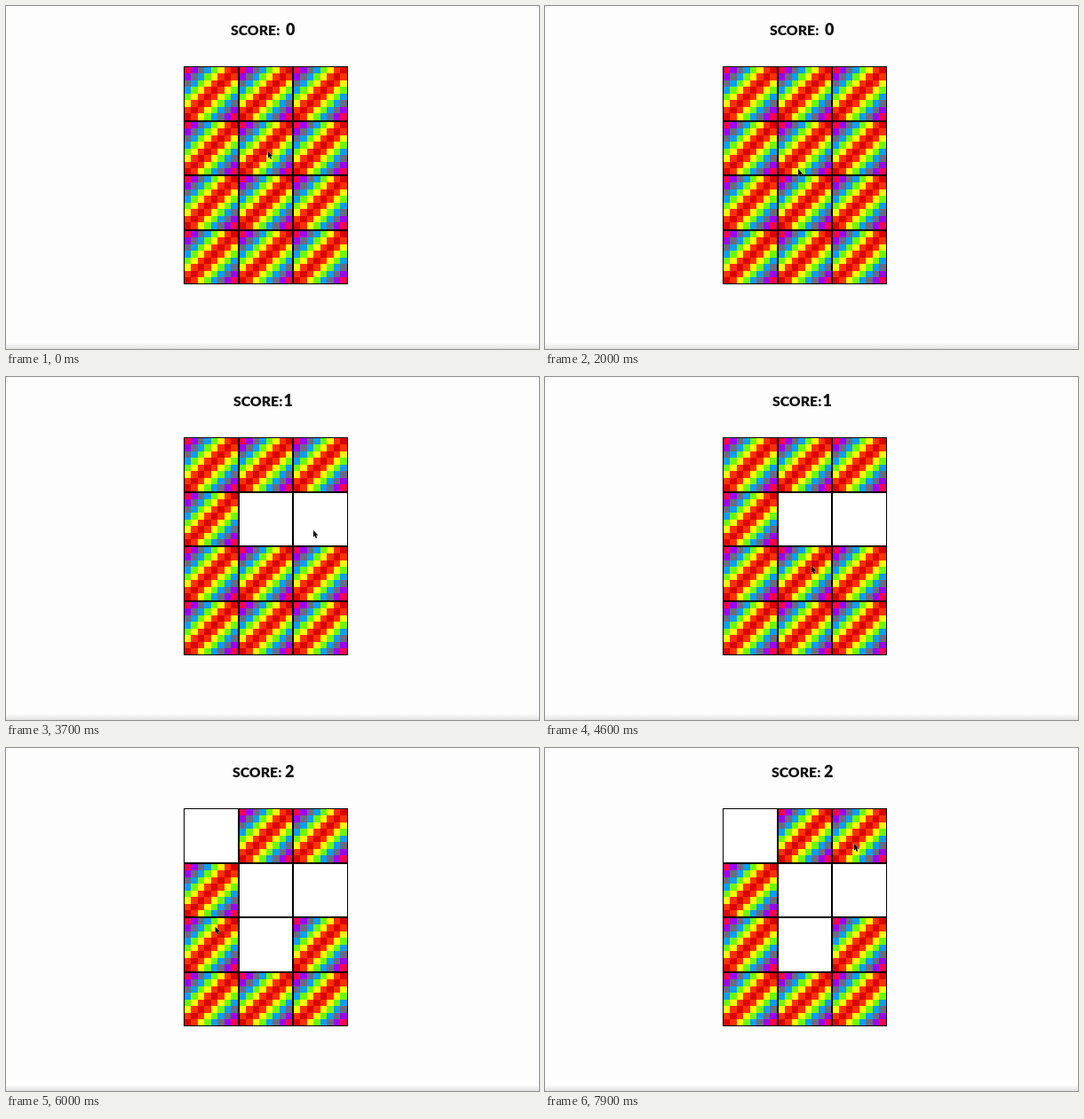
Write an HTML page with a canvas that moves like this. It is 600 px wide and 387 px high and loops after 8000 ms.

```html
<!DOCTYPE html>
<html lang="en">
<head>
<meta charset="utf-8">
<title>Memory game</title>
<style>
html, body { margin: 0; width: 100%; height: 100%; overflow: hidden; background: #fdfdfd; }
canvas { display: block; }
</style>
</head>
<body>
<canvas id="stage" width="600" height="387"></canvas>
<script>
const ctx = document.getElementById('stage').getContext('2d');
const LOOP = 8000, STEP = 100, PITCH = 61.6, LEFT = 200, TOP = 68;

// Colours by distance from the card's main diagonal
const RAINBOW = ['#da0000', '#ff3000', '#fffa00', '#6cf800', '#0c9dfa', '#696b80', '#9d00f5', '#fa0050'];

function shape(fill, d, line) {
  const path = new Path2D(d);
  ctx.fillStyle = fill;
  ctx.fill(path);
  if (line) {
    ctx.strokeStyle = line;
    ctx.lineWidth = 1;
    ctx.stroke(path);
  }
}

function background(color) {
  ctx.fillStyle = color;
  ctx.fillRect(0, 0, 62, 62);
}

function rainbow() {
  const edge = i => 1 + Math.round(i * (PITCH - 2) / 8);
  for (let r = 0; r < 8; r++)
    for (let c = 0; c < 8; c++) {
      ctx.fillStyle = RAINBOW[Math.abs(r + c - 7)];
      ctx.fillRect(edge(c), edge(r), edge(c + 1) - edge(c), edge(r + 1) - edge(r));
    }
}

function burger() {
  background('#ee82e6');
  shape('#dcebf7', 'M1 48l5-4h50l5 4z', '#5c5266');
  shape('#111', 'M1 47.5h60v1.3H1z');
  shape('#c98243', 'M9 41.5h45v3l-3 3H12l-3-3z', '#26120a');
  shape('#7d3c17', 'M7.5 32.5h48l1 4-2 4.5h-46l-2-4z', '#1c0b05');
  shape('#a85f22', 'M12 37h38v2H12z');
  shape('#ffcb1a', 'M8 32h15l-3 3-2 4-4-1-3-3zM24 32h13l-3 5-4 3-3-4zM39 32h16l-2 4-4 4-5-3z', '#3a1c08');
  shape('#6d2110', 'M7 26.5l3-1h43l4 1.5-2 3-4 1-4-1.5-5 2-5-2-5 2-6-2-5 2-5-2-5 1.5-4-1z', '#260e08');
  shape('#b9542a', 'M11 27h8v1.5h-8zM24 27.5h9V29h-9zM38 27h12v1.5H38z');
  shape('#da8d48', 'M8.5 25.5q-1-6 4-9.5 5-3 12-3.500h14q8 .5 12 3.500 5 3.500 4 9.500z', '#35190c');
  shape('#efae68', 'M17 15h27v2H17z');
  shape('#fff0b5', 'M20 15h2v1h-2zM27 16h2v1h-2zM33 14h2v1h-2zM39 16h2v1h-2zM45 18h2v1h-2zM16 18h2v1h-2z');
}

function milkshake() {
  background('#f9e981');
  shape('#58bfd0', 'M21 25v-4l4-5h12l4 5v4z', '#263c48');
  shape('#fff', 'M24 20h3v2h-3z');
  shape('#393d4d', 'M30 9h2v15h-2z');
  shape('#ee8b2f', 'M19.5 24.500h24v4h-24z', '#5c3018');
  shape('#77bd3b', 'M22 29h19l-4 23H26z', '#314c20');
  shape('#e47c28', 'M22 29h19l-1 5-3-2-2 5-3-5-3 4-3-4-3 3z');
  shape('#c8df54', 'M27 38h2v10h-2zM34 39h2v6h-2z');
  shape('#3e873b', 'M31 38h2v12h-2zM37 36h1v9h-1z');
}

function fries() {
  background('#8fd6ee');
  shape('#ffd23c', 'M20 31l-3-17h4l3 14V11h5v15l2-17h4v17l4-14h4l-2 19z', '#80511b');
  shape('#da3025', 'M17 27q14 9 28 0l-4 23H21z', '#581d18');
}

function iceCream() {
  background('#a6e4c4');
  shape('#d9974e', 'M21 30h20L31 52z', '#633916');
  shape('#fbc7d5', 'M20 30q-2-9 4-13 7-7 14 0 6 4 4 13z', '#774050');
}

// card, opened at, closed at, picture
const OPEN = [
  [0, 500, 1600, burger], [4, 1100, 1600, fries],
  [4, 2500, 3700, fries], [5, 3200, 3700, fries],
  [7, 4800, 5800, burger], [0, 5300, 5800, burger],
  [6, 6200, 7400, milkshake], [1, 6900, 7400, iceCream]
];
// time, followed by the two cards removed
const MATCHES = [[3700, 4, 5], [5800, 0, 7]];

// time, x, y of the pointer tip
const MOVES = [
  [0, 295, 164], [400, 238, 108], [550, 238, 108], [900, 282, 151], [1100, 288, 160],
  [2000, 285, 184], [2500, 288, 172], [2700, 290, 170], [3200, 345, 172], [3700, 346, 173],
  [4100, 335, 185], [4700, 293, 219], [4900, 292, 218], [5250, 234, 105], [5500, 234, 105],
  [6100, 236, 221], [6300, 236, 221], [6700, 294, 115], [6900, 297, 106], [7400, 304, 106],
  [7900, 348, 108]
];

function pointer(t) {
  const i = Math.max(1, MOVES.findIndex(m => m[0] >= t));
  const [t0, x0, y0] = MOVES[i - 1], [t1, x1, y1] = MOVES[i];
  const k = (t - t0) / (t1 - t0);
  ctx.save();
  ctx.translate(x0 + (x1 - x0) * k, y0 + (y1 - y0) * k);
  const arrow = 'M0 0v7.500l1.600-1.500 1.200 2.800 1.300-.6-1.200-2.700h2.300z';
  shape('#000', arrow, 'rgba(255,255,255,.6)');
  shape('#000', arrow);
  ctx.restore();
}

function title(score) {
  ctx.fillStyle = '#111';
  ctx.textAlign = 'left';
  ctx.font = '900 15.8px Lato, sans-serif';
  ctx.fillText('SCORE:', [253, 256, 255][score], 32.5);
  ctx.textAlign = 'right';
  ctx.font = '900 18px Lato, sans-serif';
  ctx.fillText(score, [325.5, 323, 324.5][score], 32.5);
}

function drawCard(i, t, found) {
  const col = i % 3, row = Math.floor(i / 3);
  const x = Math.round(LEFT + col * PITCH), y = Math.round(TOP + row * PITCH);
  const w = Math.round(LEFT + (col + 1) * PITCH) - x, h = Math.round(TOP + (row + 1) * PITCH) - y;
  const open = OPEN.find(([card, from, to]) => card === i && t >= from && t < to);
  ctx.save();
  ctx.fillStyle = '#000';
  ctx.fillRect(x, y, w, h);
  ctx.translate(x, y);
  ctx.beginPath();
  ctx.rect(1, 1, w - 2, h - 2);
  ctx.clip();
  if (found.some(([, a, b]) => i === a || i === b)) background('#fff');
  else if (open) open[3]();
  else rainbow();
  ctx.restore();
}

const page = ctx.createLinearGradient(0, 380, 0, 387);
page.addColorStop(0, '#fdfdfd');
page.addColorStop(1, '#e2e2e2');

function draw(t) {
  ctx.fillStyle = page;
  ctx.fillRect(0, 0, 600, 387);
  const found = MATCHES.filter(m => t >= m[0]);
  title(found.length);
  for (let i = 0; i < 12; i++) drawCard(i, t, found);
  pointer(t);
}

const start = performance.now();
function tick() {
  const t = (performance.now() - start) % LOOP;
  draw(Math.floor(t / STEP) * STEP);
  requestAnimationFrame(tick);
}
tick();
</script>
</body>
</html>
```
